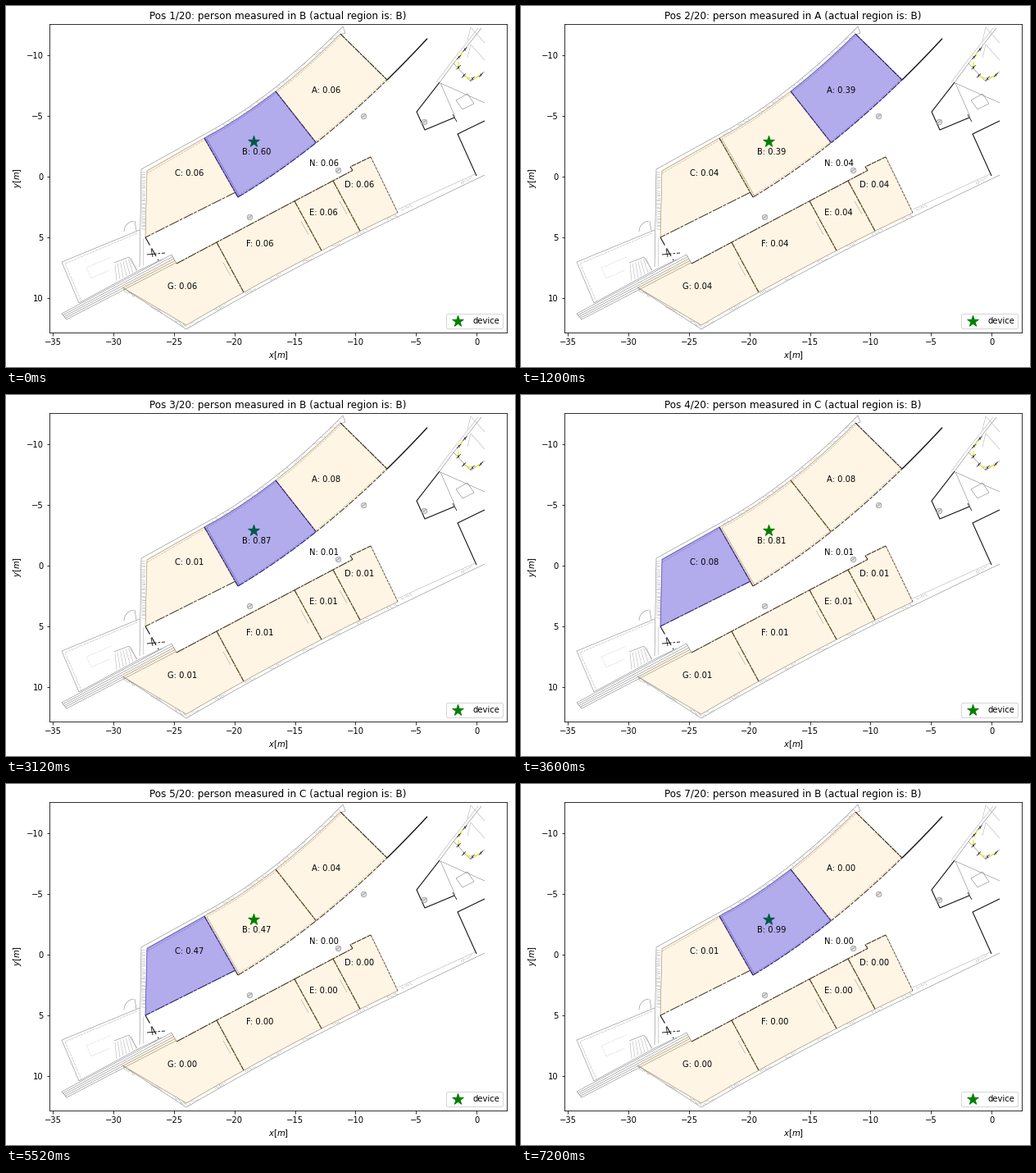
A matplotlib script that plays this animation: 621x440 px, repeating every 8 s.

```python
import math

import matplotlib.pyplot as plt
import numpy as np
from matplotlib.animation import FuncAnimation
from matplotlib.collections import LineCollection
from matplotlib.patches import Arc, Circle, Polygon

W, H = 621, 440
LEFT, RIGHT, TOP, BOTTOM = 53, 611, 22, 398
X0, Y0, SCALE = 574, 208, 14.76      # pixel position of (0, 0) and pixels per metre
GREY, PALE, BLACK = "#777777", "#aaaaaa", "#111111"

MEASURED = "BABCCBB"
HIT = 0.6                            # probability that a measurement names the right region
LABELS = {"A": (391, 106), "B": (306, 181), "C": (224, 207), "D": (431, 221),
          "E": (387, 255), "F": (310, 293), "G": (215, 345), "N": (388, 195)}

rng = np.random.default_rng(4)
plt.rcParams["font.family"] = "DejaVu Sans"
fig = plt.figure(figsize=(W / 72, H / 72), dpi=72, facecolor="white")
ax = fig.add_axes([LEFT / W, (H - BOTTOM) / H, (RIGHT - LEFT) / W, (BOTTOM - TOP) / H])


def bow(*points):
    """Parabola y(x) through three points."""
    return np.poly1d(np.polyfit(*np.transpose(points), 2))


def along(curve, a, b, shift=0):
    x = np.linspace(a, b, 14)
    return list(zip(x, curve(x) + shift))


def wall(*points, color=GREY, lw=0.5, dash="-"):
    ax.plot(*zip(*points), color=color, lw=lw, ls=dash, zorder=0.5,
            solid_capstyle="butt", dash_capstyle="butt")


def black(*points, lw=1.1, dash="-"):
    wall(*points, color=BLACK, lw=lw, dash=dash)


def hatch(curve, a, b, depth, patches):
    """Patches of loose strokes at random places along a wall."""
    strokes = []
    for start in np.linspace(a, b - 14, patches) + rng.uniform(-3, 3, patches):
        for x in np.arange(start, start + 13, 2):
            top, low = np.sort(rng.uniform(0, depth, 2))
            strokes.append([(x, curve(x) + top), (x + 1.5, curve(x + 1.5) + low)])
    ax.add_collection(LineCollection(strokes, colors="#999999", linewidths=0.5, zorder=0.5))


# long walls of the two rows of rooms
outer = bow((243, 156), (329, 99), (411, 25))
inner = bow((242, 161), (329, 104), (408, 34))
hall = bow((283, 233), (378, 167), (465, 90))
north = bow((208, 314), (257, 288), (399, 213))
south = bow((220, 389), (290, 349), (478, 252))
UPPER = (242, 329, 408)
LOWER = (257, 352, 399)
LEAN = 33                            # sideways lean of the lower partitions


def hall_x(x):
    """Where the partition that starts at x on the upper wall meets the hall."""
    return x + 41 + (x - UPPER[0]) / 10.4


def upper_room(a, b):
    return along(inner, a, b) + along(hall, hall_x(b), hall_x(a))


def lower_room(a, b):
    return along(north, a, b) + along(south, b + LEAN, a + LEAN)


C_ROOM = [(242, 161), (280, 227), (170, 282), (172, 200)]
D_STEP = [(423, north(423)), (420, 196), (445, 184)]
ROOMS = {
    "A": upper_room(*UPPER[1:]),
    "B": upper_room(*UPPER[:2]),
    "C": C_ROOM,
    "D": [(399, north(399)), *D_STEP, *along(south, 478, 432)],
    "E": lower_room(*LOWER[1:]),
    "F": lower_room(*LOWER[:2]),
    "G": [(142, 343), (205, 308), *along(north, 208, 257), *along(south, 290, 220)],
}


def draw_upper_rooms():
    wall((163, 318), (165, 199), *along(outer, 243, 411), (414, 33), (408, 35))
    wall((170, 282), (172, 201), *along(inner, 242, 408))
    wall((172, 204), *along(inner, 242, 408, 2.5), color=PALE, dash=(0, (6, 2)))
    wall((167, 283), (167, 316), color=PALE)
    hatch(outer, 243, 410, 5, 8)
    for y in np.arange(203, 272, 2.2):
        wall((165, y), (170, y + rng.uniform(-2, 2)), color=PALE)

    for x in UPPER:
        end = hall_x(x)
        black((x, inner(x)), (end, hall(end)), dash=(0, (7, 0.7, 3, 0.7)))
    wall((245, 162), (285, 232))
    black(*C_ROOM[1:3], lw=0.9, dash=(0, (14, 2, 4, 1.5)))
    black(*along(hall, 283, 465), lw=0.9, dash=(0, (9, 2, 4, 2)))
    black(*along(hall, 465, 514), lw=1.4)
    wall(*along(hall, 283, 465, -2), color=PALE, dash=(0, (5, 3)))


def draw_lower_rooms():
    black(*along(north, 208, 423), lw=1, dash=(0, (11, 1, 3, 1)))
    black(*D_STEP, lw=1, dash=(0, (6, 1)))
    for x in LOWER:
        end = x + LEAN
        black((x, north(x)), (end, south(end)), dash=(0, (7, 0.7, 3, 0.7)))
        wall((x + 8, north(x) + 25), (x + 17, north(x) + 41), dash=(0, (3, 1)))
    black((445, 184), (478, 252), lw=0.7, dash=(0, (5, 1.5)))

    wall((142, 343), *along(south, 220, 480, 5), (584, 206))
    wall((142, 343), *along(south, 220, 478))
    wall((478, 248), (572, 205), color=PALE)
    hatch(south, 220, 478, 5, 8)
    hatch(bow((142, 343), (181, 366), (220, 389)), 142, 220, 4, 3)
    hatch(bow((478, 248), (525, 227), (572, 206)), 480, 570, 5, 2)


def draw_stairwell():
    wall((163, 273), (68, 312), (89, 362))
    wall((160, 277), (72, 314), (92, 360), color=PALE, dash=(0, (6, 2)))
    for k in range(5):
        wall((68 + 1.4 * k, 375 + 1.8 * k), (202 + 1.5 * k, 303 + 2.4 * k))
    wall((68, 375), (74, 382))
    wall((202, 303), (208, 314))
    wall((89, 362), (163, 322), (190, 309))
    wall((128, 306), (98, 319), (104, 332), (126, 322), color=PALE, dash=(0, (2, 3)))
    wall((132, 313), (150, 306), (160, 322))
    for k in range(7):
        wall((133 + 3.3 * k, 315 - 1.3 * k), (135 + 4 * k, 335 - 2 * k), color=PALE)
    ax.add_patch(Arc((157, 275), 26, 26, theta1=180, theta2=265, ec=GREY, lw=0.5, zorder=0.5))
    wall((157, 262), (159, 274))
    black((170, 282), (186, 310), dash=(0, (10, 4)))
    black((172, 303), (194, 301), lw=0.9, dash=(0, (13, 2, 3, 2)))
    black((177, 296), (179, 306), lw=0.8)


def draw_right_wing():
    for shift, color in ((0, GREY), (-4, PALE)):
        wall((580 + shift, 27), (546 + shift, 70), (529 + shift, 93), color=color)
    black((529, 93), (501, 129), (511, 151), (547, 136))
    black((545, 132), (550, 141), lw=0.8)
    black((584, 140), (551, 156), (574, 207))
    wall((548, 135), (530, 94), (584, 118))
    wall((549, 115), (563, 107), (571, 119), (557, 126), (549, 115))
    wall((546, 70), (567, 92), (584, 80))
    for y in (26, 47):
        wall((563, y + 16), (567, y), (584, y + 19), color=PALE)

    ring = [(568 + 17 * math.cos(t), 70 + 19 * math.sin(t))
            for t in np.radians(np.arange(50, 241, 38))]
    wall(*ring[:3], color="#f2ee12", lw=1.4, dash=(0, (5, 4)))
    wall(*ring[3:], color="#f2ee12", lw=1.4, dash=(0, (5, 4)))
    for x, y in ring:
        black((x - 2, y + 2), (x + 3, y - 3), lw=0.7)
        black((x, y - 2), (x + 1, y + 1), lw=0.7)


def draw_columns():
    for x, y in ((436, 134), (405, 200), (297, 257), (510, 141)):
        ax.add_patch(Circle((x + 0.5, y + 0.5), 3.3, fc="#dddddd", ec="#999999",
                            lw=0.7, zorder=0.5))
        wall((x - 2, y + 2), (x + 3, y - 2))


def posterior(step):
    """Bayesian update of a uniform prior with all measurements up to this step."""
    miss = (1 - HIT) / (len(LABELS) - 1)
    seen = MEASURED[:step + 1]
    weights = {name: (HIT / miss) ** seen.count(name) for name in LABELS}
    total = sum(weights.values())
    return {name: weight / total for name, weight in weights.items()}


def ticks(origin, values):
    return [origin + SCALE * v for v in values], [f"{v}".replace("-", "\u2212") for v in values]


draw_upper_rooms()
draw_lower_rooms()
draw_stairwell()
draw_right_wing()
draw_columns()

for shape in ROOMS.values():
    ax.add_patch(Polygon(shape, color="orange", alpha=0.1, lw=1, zorder=1))
ax.scatter([302], [165], s=200, marker="*", color="green", label="device", zorder=1.5)
marked = ax.add_patch(Polygon(ROOMS["B"], color="blue", alpha=0.3, lw=1, zorder=2))
texts = {name: ax.text(x, y, "", ha="center", va="baseline", fontsize=10, zorder=3)
         for name, (x, y) in LABELS.items()}

ax.set_xlim(LEFT, RIGHT)
ax.set_ylim(BOTTOM, TOP)
ax.set_xticks(*ticks(X0, range(-35, 1, 5)))
ax.set_yticks(*ticks(Y0, range(-10, 11, 5)))
ax.set_xlabel("$x[m]$")
ax.set_ylabel("$y[m]$")
ax.legend(loc="lower right")
title = ax.set_title("", fontsize=12)


def update(i):
    step = i // 3
    region = MEASURED[step]
    title.set_text(f"Pos {step + 1}/20: person measured in {region} (actual region is: B)")
    marked.set_xy(ROOMS[region])
    for name, chance in posterior(step).items():
        texts[name].set_text(f"{name}: {chance:.2f}")
    return [title, marked, *texts.values()]


anim = FuncAnimation(fig, update, frames=20, interval=400, repeat=True, repeat_delay=0, blit=False)
plt.show()
```
